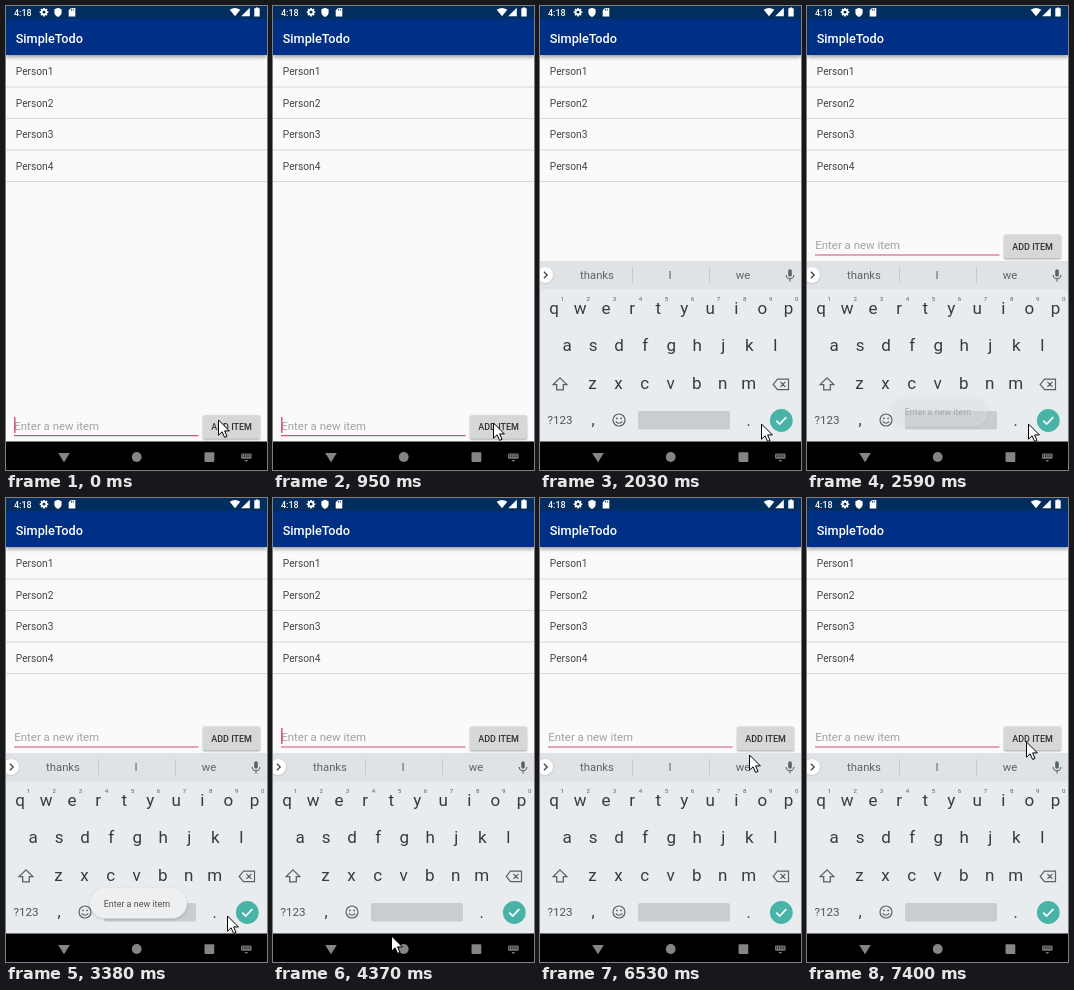
These frames come from a looping animation (261x464 px, 7.99 s). An HTML page with a canvas:

```html
<!DOCTYPE html>
<html lang="en">
<head>
<meta charset="utf-8">
<title>SimpleTodo</title>
<style>
html, body { margin: 0; width: 100%; height: 100%; overflow: hidden; background: #fafafa; }
canvas { display: block; width: 261px; height: 464px; }
</style>
</head>
<body>
<canvas id="stage" width="261" height="464"></canvas>
<script>
const ctx = document.getElementById('stage').getContext('2d');
const LOOP = 7990;

// Each track lists [start time, value]; values hold until the next entry.
const pointer = [
  [0, [212, 413]], [150, [216, 414]], [830, [218, 415]], [950, [220, 416]], [1070, [221, 417]],
  [4370, [118, 437]], [4930, [65, 450]], [5240, [58, 451]], [5520, [57, 451]],
  [6380, [168, 306]], [6530, [209, 256]], [6780, [216, 246]], [6900, [219, 243]]
];
const caret = [
  [0, 1], [400, 0], [950, 1], [2030, 0], [2980, 1], [3380, 0], [4090, 1],
  [4520, 0], [4930, 1], [5520, 0], [5950, 1], [6530, 0], [6900, 1], [7400, 0]
];
const toast = [[0, 0], [2590, .35], [2710, .7], [2830, .92], [2980, 1], [4090, .94], [4370, 0]];
const press = [[0, 0], [1470, 1], [1750, 2], [2030, 0]];

function at(track, t) {
  let value = track[0][1];
  for (const [start, v] of track) if (t >= start) value = v;
  return value;
}

function text(str, x, y, size, color, align = 'left', weight = 400) {
  ctx.font = `${weight} ${size}px Roboto, sans-serif`;
  ctx.textAlign = align;
  ctx.fillStyle = color;
  ctx.fillText(str, x, y);
}

function box(x, y, w, h, color, r = 0) {
  ctx.fillStyle = color;
  ctx.beginPath();
  ctx.roundRect(x, y, w, h, r);
  ctx.fill();
}

function disc(x, y, r, color) {
  ctx.fillStyle = color;
  ctx.beginPath();
  ctx.arc(x, y, r, 0, Math.PI * 2);
  ctx.fill();
}

function shape(d, x, y, fill, stroke, width = 1) {
  const path = new Path2D(d);
  ctx.save();
  ctx.translate(x, y);
  if (fill) { ctx.fillStyle = fill; ctx.fill(path); }
  if (stroke) { ctx.strokeStyle = stroke; ctx.lineWidth = width; ctx.stroke(path); }
  ctx.restore();
}

function shadowed(blur, dy, alpha, draw) {
  ctx.save();
  ctx.shadowColor = `rgba(0,0,0,${alpha})`;
  ctx.shadowBlur = blur;
  ctx.shadowOffsetY = dy;
  draw();
  ctx.restore();
}

function statusBar() {
  box(0, 0, 261, 13, '#022d5f');
  text('4:18', 8, 9.6, 9, '#fff', 'left', 500);
  for (let i = 0; i < 4; i++) {
    const a = i * Math.PI / 4, c = Math.cos(a) * 4.3, s = Math.sin(a) * 4.3;
    shape(`M${-c} ${-s}L${c} ${s}`, 38, 6.2, null, '#fff', 1.7);
  }
  disc(38, 6.2, 3.2, '#fff');
  disc(38, 6.2, 1.4, '#022d5f');
  shape('M0-4.5L3.6-3V0C3.6 2.4 2 4 0 4.8C-2 4-3.6 2.4-3.6 0V-3Z', 52, 6.2, '#fff');
  shape('M-1-4.3H3.3V4.3H-3.3V-2Z', 66, 6.2, '#fff');
  shape('M-.5-3.5V-1.6M1.3-3.5V-1.6', 66, 6.2, null, '#022d5f', .8);
  shape('M-5.3-2.2Q0-6 5.3-2.2L0 4.2Z', 229, 6, '#fff');
  shape('M4.3-4.3V4.3H-4.3Z', 239.5, 6, '#fff');
  shape('M-1.2-4.6H1.2V-3.7H2.7V4.6H-2.7V-3.7H-1.2Z', 251, 6, '#fff');
}

function app() {
  box(0, 0, 261, 464, '#fafafa');
  shadowed(4, 1.5, .4, () => box(0, 13, 261, 36, '#002f86'));
  statusBar();
  text('SimpleTodo', 9.7, 36.8, 12.7, '#fff', 'left', 500);
  for (let i = 0; i < 4; i++) {
    text('Person' + (i + 1), 9.8, 69 + 31.5 * i, 10.2, '#444');
    box(0, 80.6 + 31.5 * i, 261, 1, '#d9d9d9');
  }
}

function inputRow(y, caretOn, pressed) {
  text('Enter a new item', 8.3, y + 15, 11.43, '#a2a2a2');
  box(8, y + 20, 184.5, 1.2, '#d64d78');
  if (caretOn) box(8.2, Math.round(y + 2), 1.2, 16, '#cf3068');
  shadowed(pressed > 1 ? 5 : 2, pressed > 1 ? 2 : 1, .35, () =>
    box(197, y + .2, 57, 23.6, pressed ? '#b9baba' : '#d6d7d7', 1.5));
  text('ADD ITEM', 225.6, y + 15.2, 8.95, '#303030', 'center', 500);
}

function keyRow(keys, x, y, hints) {
  [...keys].forEach((key, i) => {
    const cx = x + 26.05 * i;
    text(key, cx, y, 17, '#343c42', 'center');
    if (hints) text((i + 1) % 10, cx + 8.3, y - 12.6, 6.2, '#596168', 'center');
  });
}

function keyboard() {
  const ink = '#596168';
  box(0, 255, 261, 181, '#e8ecef');
  box(0, 255, 261, 28.5, '#dfe3e6');
  shadowed(2, .5, .2, () => disc(5, 269, 8, '#fff'));
  shape('M-1.6-3.3L1.7 0L-1.6 3.3', 5.5, 269, null, '#444', 1.3);
  ['thanks', 'I', 'we'].forEach((word, i) => text(word, 57 + 73 * i, 273.2, 11.3, '#5b6369', 'center'));
  for (const x of [92, 169]) box(x, 261, 1, 16, '#c5cacd');
  box(248.2, 263.2, 3.6, 7.6, ink, 1.8);
  shape('M-3.8-.5A3.8 3.8 0 0 0 3.8-.5M0 3.3V6', 250, 269.4, null, ink, 1.1);

  keyRow('qwertyuiop', 14, 307.6, true);
  keyRow('asdfghjkl', 27, 345.2);
  keyRow('zxcvbnm', 52.5, 383);
  shape('M0-6.4L6.8 .3H3.3V5.5H-3.3V.3H-6.8Z', 20, 378.3, null, ink, 1.3);
  shape('M-3.5-5.3H7.5V5.3H-3.5L-7.8 0ZM-.6-2.5L4.4 2.5M4.4-2.5L-.6 2.5', 241, 378.4, null, ink, 1.2);

  text('?123', 20, 418, 11.6, '#4c545a', 'center');
  text(',', 53, 418.5, 16, '#343c42', 'center');
  shape('M6 0A6 6 0 1 1-6 0A6 6 0 1 1 6 0M-3.3 1.3Q0 5.2 3.3 1.3', 79, 414, null, ink, 1.2);
  disc(76.9, 412.4, .9, ink);
  disc(81.1, 412.4, .9, ink);
  box(98, 405, 92, 18.5, '#c9cdd0', 2);
  text('.', 208.5, 419.5, 16, '#343c42', 'center');
  disc(241.3, 414.5, 11.4, '#48b4a8');
  shape('M-5 .2L-1.6 3.5L5-3.3', 241.3, 414.5, null, '#fff', 1.7);
}

function navBar() {
  const grey = '#858585';
  box(0, 435.5, 261, 28.5, '#000');
  shape('M-5.8-4.2H5.8L0 5Z', 58, 451.2, grey);
  disc(130.7, 451, 4.9, grey);
  box(198.5, 446.3, 9.8, 9.6, grey, .8);
  box(235, 447.5, 10.6, 5.2, '#777', 1);
  for (const y of [448.6, 450.2]) {
    for (let x = 236.2; x < 245; x += 1.8) box(x, y, .8, .8, '#000');
  }
  shape('M-2 0H2L0 2Z', 240.3, 454, '#777');
}

function toastMessage(alpha) {
  if (!alpha) return;
  ctx.save();
  ctx.globalAlpha = alpha;
  shadowed(3, 1, .16, () => box(84, 390, 97, 30.5, '#eeeff0', 15.2));
  text('Enter a new item', 97.7, 408.5, 8.95, '#505050');
  ctx.restore();
}

function arrow([x, y]) {
  ctx.lineJoin = 'miter';
  shape('M.5 1V16.2L4.1 12.8L6.6 18.4L9 17.4L6.6 11.9H11.4Z', x, y, '#fff', '#000', 1);
}

function draw(t) {
  const typing = t >= 2030;
  app();
  if (!typing || t >= 2590) inputRow(typing ? 228.4 : 409, at(caret, t), at(press, t));
  if (typing) keyboard();
  navBar();
  toastMessage(at(toast, t));
  arrow(at(pointer, t));
}

const start = performance.now();
function tick() {
  draw((performance.now() - start) % LOOP);
  requestAnimationFrame(tick);
}
tick();
</script>
</body>
</html>
```
